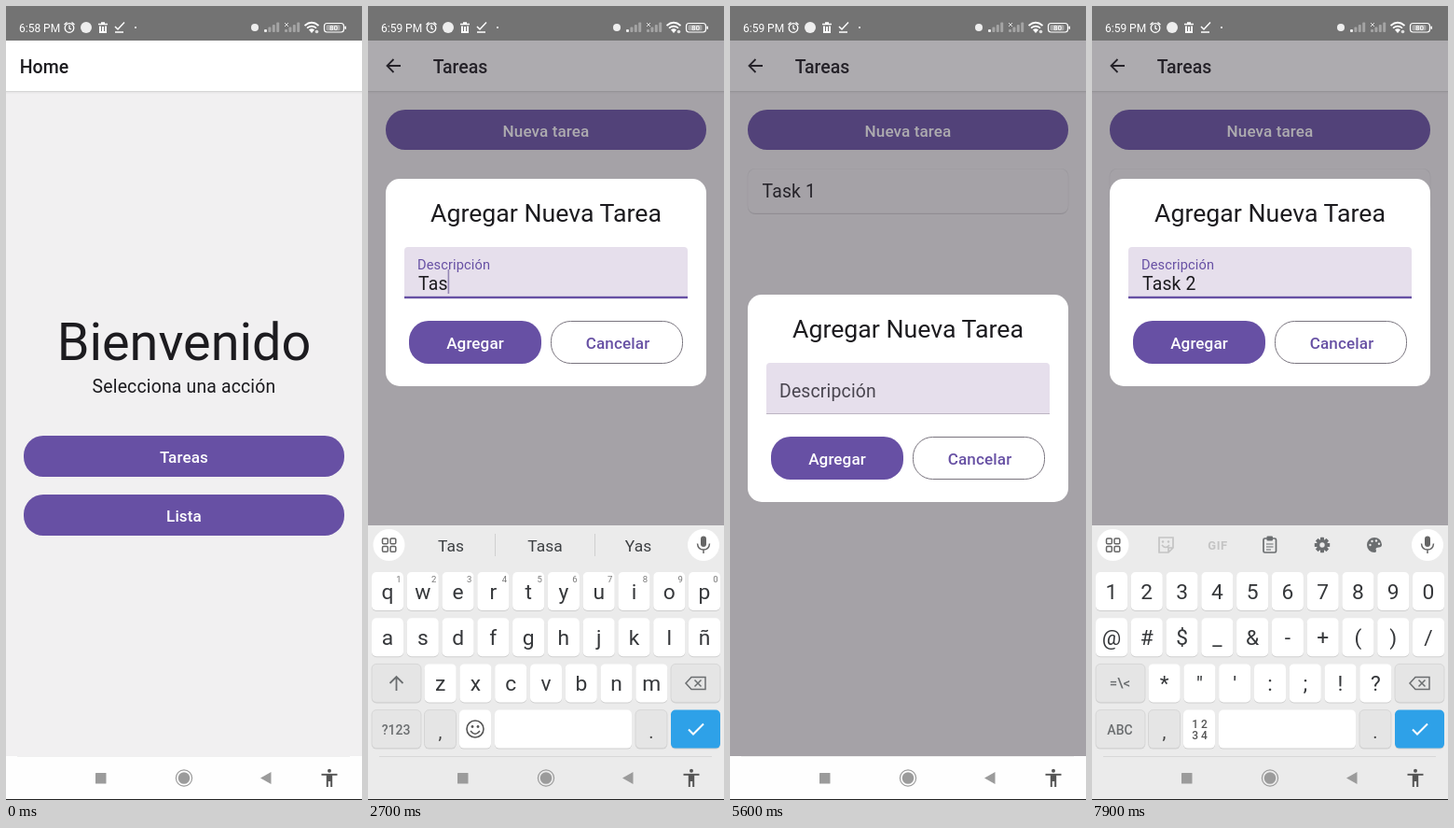
Recreate the animation shown at these times as an HTML page. Size 382 px wide and 850 px high, loop 8 s.

```html
<!DOCTYPE html>
<html lang="es">
<head>
<meta charset="utf-8">
<style>
html, body { margin: 0; height: 100%; overflow: hidden; background: #f1f0f1; }
svg { display: block; width: 100%; height: 100%; font-family: Roboto, "Noto Sans", sans-serif; }
text { white-space: pre; }
</style>
</head>
<body>
<svg id="stage" viewBox="0 0 382 850"></svg>
<script>
const LOOP = 8000, PURPLE = '#6750a4', INK = '#1c1b1f', BG = '#f1f0f1';
const stage = document.getElementById('stage');
const pen = document.createElement('canvas').getContext('2d');

// Moments at which the field's text becomes each value
const typing = [
  [0, ''], [2350, 'T'], [2500, 'Ta'], [2650, 'Tas'], [2850, 'Task'], [3150, 'Task '], [3950, 'Task 1'],
  [4950, ''], [6250, 'T'], [6400, 'Ta'], [6550, 'Tas'], [6750, 'Task'], [6950, 'Task '], [7400, 'Task 2']
];
const hints = {
  T: ['T', 'Te', 'Tu'], Ta: ['Ta', 'TA', 'Ya'], Tas: ['Tas', 'Tasa', 'Yas'], Task: ['Task', 'Tasks', 'Tasa']
};
const letters = ['qwertyuiop', 'asdfghjklñ', 'zxcvbnm'];
const symbols = ['1234567890', '@#$_&-+()/', `*"':;!?`];

const ramp = (t, a, b) => Math.min(1, Math.max(0, (t - a) / (b - a)));
const ease = p => 1 - (1 - p) ** 3;
const mix = (a, b, p) => a + (b - a) * p;
const within = (t, a, b) => t >= a && t < b;
const esc = s => s.replace(/&/g, '&amp;').replace(/</g, '&lt;');

const text = (x, y, s, size, fill = INK, more = '') =>
  `<text x="${x}" y="${y}" font-size="${size}" fill="${fill}" ${more}>${esc(s)}</text>`;
const mid = (x, y, s, size, fill, more = '') => text(x, y, s, size, fill, 'text-anchor="middle" ' + more);
const body = (x, y, s, more = '') => text(x, y, s, 19.4, INK, `letter-spacing=".18" ${more}`);
const rect = (x, y, w, h, r, fill, more = '') =>
  `<rect x="${x}" y="${y}" width="${w}" height="${h}" rx="${r}" fill="${fill}" ${more}/>`;
const circle = (x, y, r, fill, more = '') => `<circle cx="${x}" cy="${y}" r="${r}" fill="${fill}" ${more}/>`;
const line = (d, color, w = 1.5, more = '') =>
  `<path d="${d}" fill="none" stroke="${color}" stroke-width="${w}" ${more}/>`;
const shape = (d, fill) => `<path d="${d}" fill="${fill}"/>`;
const group = (inner, more) => `<g ${more}>${inner}</g>`;

function button(x, y, w, h, label, pressed) {
  return rect(x, y, w, h, 21, PURPLE) + (pressed ? rect(x, y, w, h, 21, '#fff', 'opacity=".14"') : '') +
    mid(x + w / 2, y + h / 2 + 7, label, 17.1, '#fff', 'font-weight="500" letter-spacing=".1"');
}

function bars(x, lit) {
  return [3, 5.5, 8, 10.5].map((h, i) =>
    rect(x + i * 4.4, 28 - h, 3, h, 1, '#fff', `opacity="${i < lit ? 0.85 : 0.35}"`)).join('');
}

const statusIcons =
  circle(68, 23.5, 4.8, 'none', 'stroke="#fff" stroke-width="1.3"') +
  line('M68 20.5V24L70 25M62.5 20L65.5 17.5M73.5 20L70.5 17.5', '#fff', 1.3) +
  circle(86, 23, 6, '#eee') +
  line('M99 19.5H109M102 18H106', '#fff') + line('M101 21.5V28H107V21.5M104 22V27', '#fff', 2) +
  line('M117 22L120 25L127 17.5M117 28H126', '#fff') +
  circle(139, 23, 1, '#fff') + circle(267, 23, 4, '#eee') +
  bars(277, 1) + bars(299, 0) + line('M299 18L303 22M303 18L299 22', '#ddd', 1) +
  line('M320.5 21Q328 14.5 335.5 21M323 23.7Q328 19.5 333 23.7', '#fff', 1.7) +
  shape('M325 25.5Q328 23 331 25.5L328 29Z', '#fff') + circle(333.5, 27.5, 1.8, '#ddd') +
  rect(341.5, 18.5, 21, 9.5, 3, 'none', 'stroke="#fff" stroke-width="1.2"') +
  rect(343.5, 20.3, 15, 6, 1.5, '#fff', 'opacity=".35"') + rect(363.5, 21.5, 1.5, 3.5, 0.7, '#fff') +
  mid(351.5, 26.2, '80', 8, '#fff', 'font-weight="500"');

const statusBar = late => rect(0, 0, 382, 37, 0, '#737373') +
  text(14, 28, late ? '6:59 PM' : '6:58 PM', 12, '#fff') + statusIcons;

const navIcons =
  rect(96, 821, 11.5, 11.5, 0.5, '#9b9b9b') +
  circle(191, 826.5, 6.3, '#9b9b9b') + circle(191, 826.5, 8.6, 'none', 'stroke="#9b9b9b" stroke-width="1.2"') +
  shape('M273 826.5L284.5 820V833Z', '#9b9b9b') +
  circle(347, 818.7, 2, '#555') + line('M338.5 822.8H355.5', '#555', 1.9) +
  shape('M343.8 822H350.2V836H348.2V830H345.8V836H343.8Z', '#555') +
  rect(0, 849, 382, 1, 0, '#222');

const header = rect(0, 37, 382, 54, 0, '#fff') + rect(0, 91, 382, 1, 0, '#d6d6d6') +
  rect(0, 92, 382, 1.5, 0, '#e8e7e8');
const title = (x, s) => text(x, 72, s, 19.5, INK, 'font-weight="500"');

const home = t => rect(0, 37, 382, 766, 0, BG) + header + title(14.7, 'Home') +
  mid(191, 379, 'Bienvenido', 55.8) + mid(191, 414, 'Selecciona una acción', 19.4, INK, 'letter-spacing=".18"') +
  button(19, 460, 344, 44, 'Tareas', within(t, 250, 500)) + button(19, 523, 344, 44, 'Lista');

function tasks(t) {
  const list = t < 4700 ? body(33.5, 205, 'No hay elementos')
    : rect(19, 174.5, 344, 48.5, 8, '#cfcdd0') + rect(18.6, 174, 344.8, 48, 8, '#e3e1e4') +
      rect(19.3, 174.6, 343.4, 47, 8, BG) + body(34.5, 205, 'Task 1');
  return rect(0, 37, 382, 766, 0, BG) + header + line('M35 64H20.5M27.5 57L20.5 64L27.5 71', INK, 1.8) +
    title(69.7, 'Tareas') +
    button(19, 111, 344, 43, 'Nueva tarea', within(t, 1200, 1450) || within(t, 5080, 5280)) + list;
}

function dialog(t, value, since, focus, lift) {
  const up = value ? 1 : focus;
  const size = mix(19.4, 14.6, up);
  pen.font = '19.4px Roboto, "Noto Sans", sans-serif';
  const caret = 54 + pen.measureText(value).width + value.length * 0.18;
  const lit = focus > 0 && (t - since) % 1000 < 500;
  const tone = [[73, 103], [69, 80], [79, 164]].map(([a, b]) => Math.round(mix(a, b, focus)));
  return group(
    rect(19, 309, 344, 222, 15, '#fff') +
    mid(191, 355, 'Agregar Nueva Tarea', 26.7) +
    shape('M39 437V386Q39 382 43 382H339Q343 382 343 386V437Z', '#e6dfec') +
    (focus ? rect(39, 434.8, 304, 2.4, 0, PURPLE) : rect(39, 436, 304, 1, 0, '#bdb5c3')) +
    text(53, mix(418.5, 405.5, up), 'Descripción', size, `rgb(${tone})`,
      `letter-spacing="${size * 0.009}" opacity="${1 - 0.8 * focus * (1 - focus)}"`) +
    body(54, 427.5, value) +
    (lit ? rect(caret, 406, 1.6, 26, 0, '#9486b4') : '') +
    button(44, 461, 142, 46, 'Agregar', within(t, 4580, 4750)) +
    rect(196.5, 461.5, 141, 45, 21, '#fff', 'stroke="#79747e"') +
    mid(268, 491, 'Cancelar', 17.1, PURPLE, 'font-weight="500" letter-spacing=".1"'),
    `transform="translate(0 ${-124 * lift})"`);
}

const PITCH = 37.78, GRAY = '#6b6e70';
const keyX = (row, i) => 21 + PITCH * (i + (row === 2 ? 1.5 : 0));
const keyY = row => 606 + 49.2 * row;

function key(x, row, w, fill = '#fff') {
  const y = keyY(row);
  return rect(x, y + 1, w, 41, 5, '#cfcfcf') +
    rect(x, y, w, 41, 5, fill, fill === '#e5e5e5' ? 'stroke="#d2d2d2" stroke-width=".8"' : '');
}

function keyboard(rows, upper) {
  const sym = rows === symbols, flat = '#e5e5e5';
  let s = rect(0, 556, 382, 294, 0, '#ebebeb') + rect(12, 803, 357, 1, 0, '#d8d8d8');
  rows.forEach((row, r) => [...row].forEach((c, i) => {
    const x = keyX(r, i), y = keyY(r);
    s += key(x - 17, r, 34) + mid(x, y + 29, upper ? c.toUpperCase() : c, 22.8, '#36383b');
    if (!sym && r === 0) s += mid(x + 12, y + 11, String((i + 1) % 10), 9.5, '#777');
  }));
  s += key(4, 2, 53, flat) + key(325, 2, 53, flat) + key(4, 3, 53, flat) + key(60.5, 3, 34, flat) +
    key(98, 3, 34) + key(136, 3, 147) + key(287, 3, 34, flat) + key(325, 3, 53, '#2ea1e8') +
    mid(77.5, 784, ',', 20, '#444') + mid(304, 784, '.', 20, '#444') +
    line('M344 774.5L349 779.5L360 768.5', '#fff', 2) +
    line('M347 718.5H362V731.5H347L341 725ZM350.5 721.5L357.5 728.5M357.5 721.5L350.5 728.5', GRAY, 1.5) +
    mid(30, 779.5, sym ? 'ABC' : '?123', 14, GRAY, 'font-weight="500"');
  if (sym) {
    s += mid(30, 730, '=\\<', 15, GRAY, 'font-weight="500"') +
      mid(115.5, 773, '1 2', 12, '#555', 'font-weight="500"') + mid(115.5, 785, '3 4', 12, '#555', 'font-weight="500"');
  } else {
    s += upper ? shape('M30.5 716L38 724H33V733H28V724H23Z', '#2ea1e8')
      : line('M30.5 733V718M23.5 725L30.5 718L37.5 725', GRAY, 1.8);
    s += circle(115, 774, 9, 'none', 'stroke="#555" stroke-width="1.6"') +
      circle(112, 771.5, 1.4, '#555') + circle(118, 771.5, 1.4, '#555') + line('M110 776Q115 782.5 120 776', '#555');
  }
  s += circle(22.5, 577, 17, '#fff') + circle(360, 577, 17, '#fff');
  for (const x of [15.5, 24]) for (const y of [570, 578.5])
    s += rect(x, y, 5.8, 5.8, 1.3, 'none', 'stroke="#666" stroke-width="1.5"');
  return s + rect(357, 567.5, 6, 11.5, 3, '#666') + line('M353.5 575.5Q354 582 360 582Q366 582 366.5 575.5M360 582V586', '#666');
}

const teeth = [...Array(8)].map((_, i) => rect(245, 568.8, 4, 4, 0.6, GRAY, `transform="rotate(${i * 45} 247 577)"`)).join('');
const toolbar =
  line('M72 569H87V580L82 585H72ZM87 580H82V585M75 577Q79 582 83 577', '#c4c4c4', 1.7) +
  circle(76, 573.5, 1.2, '#c4c4c4') + circle(82, 573.5, 1.2, '#c4c4c4') +
  mid(135, 581.5, 'GIF', 13, '#c4c4c4', 'font-weight="700" letter-spacing=".6"') +
  rect(184, 570, 13.5, 15, 1.5, 'none', `stroke="${GRAY}" stroke-width="1.7"`) + rect(187.5, 567.5, 6.5, 5, 1, GRAY) +
  line('M187 576H194.5M187 579H194.5M187 582H192', GRAY, 1.2) +
  teeth + circle(247, 577, 4.4, 'none', `stroke="${GRAY}" stroke-width="3.4"`) +
  shape('M303 569A8 8 0 0 0 303 585Q306 585 304.5 581.5Q304.5 579.5 308 579.5Q311 579.5 311 576.5Q310 569 303 569Z', GRAY) +
  [[298.5, 577], [300.5, 573], [305, 572.5], [308, 575.8]].map(p => circle(...p, 1.2, '#ebebeb')).join('');

const boards = { upper: keyboard(letters, true), lower: keyboard(letters), sym: keyboard(symbols) };

function hintBar(words) {
  return words.map((w, i) => mid([89, 190, 290][i], 584, w, 17.4, '#3c3f42')).join('') +
    rect(136, 565, 1, 24, 0, '#d0d0d0') + rect(243, 565, 1, 24, 0, '#d0d0d0');
}

function popup(c, rows) {
  const row = rows.findIndex(r => r.includes(c.toLowerCase()));
  if (row < 0) return '';
  const x = keyX(row, rows[row].indexOf(c.toLowerCase())), y = keyY(row);
  return rect(x - 19.3, y - 68.5, 38.6, 112, 5, '#000', 'opacity=".1"') + rect(x - 18.7, y - 69, 37.4, 111.5, 5, '#bbb') +
    rect(x - 18.5, y - 69.5, 37, 110.5, 5, '#fff') + mid(x, y - 32, c, 22.8, '#36383b');
}

function draw(t) {
  const n = typing.findLastIndex(e => t >= e[0]);
  const [at, value] = typing[n], next = typing[n + 1];
  const first = t < 4930;
  const focus = first ? ramp(t, 1900, 2050) : ramp(t, 5780, 5930);
  const since = value ? at : first ? 1900 : 5780;
  const shown = first ? ramp(t, 1450, 1670) - ramp(t, 4700, 4920) : ramp(t, 5280, 5500);
  const lift = first ? ease(ramp(t, 2050, 2250)) - ease(ramp(t, 4650, 4900)) : ease(ramp(t, 5930, 6130));
  const enter = ease(ramp(t, 500, 850));
  const sym = within(t, 3450, 4930) || t >= 7150;
  let s = '';

  if (enter < 1) s += home(t);
  if (enter > 0) s += group(tasks(t),
    `opacity="${enter}" transform="translate(191 420) scale(${mix(0.85, 1, enter)}) translate(-191 -420)"`);
  if (shown > 0) s += group(rect(0, 37, 382, 766, 0, 'rgb(50,47,55)', 'opacity=".4"') +
    dialog(t, value, since, focus, lift), `opacity="${shown}"`);
  s += rect(0, 803, 382, 47, 0, '#fefefe') + rect(12, 803, 357, 1, 0, '#f0f0f0');
  if (lift > 0) {
    const board = sym ? boards.sym : value ? boards.lower : boards.upper;
    const pressed = next && t >= next[0] - 100 && next[1].length > value.length;
    s += group(board + (!sym && hints[value] ? hintBar(hints[value]) : toolbar) +
      (pressed ? popup(next[1].slice(-1), sym ? symbols : letters) : ''),
      `transform="translate(0 ${294 * (1 - lift)})"`);
  }
  stage.innerHTML = s + navIcons + statusBar(t >= 800);
}

const start = performance.now();
function tick() {
  draw((performance.now() - start) % LOOP);
  requestAnimationFrame(tick);
}
tick();
</script>
</body>
</html>
```
